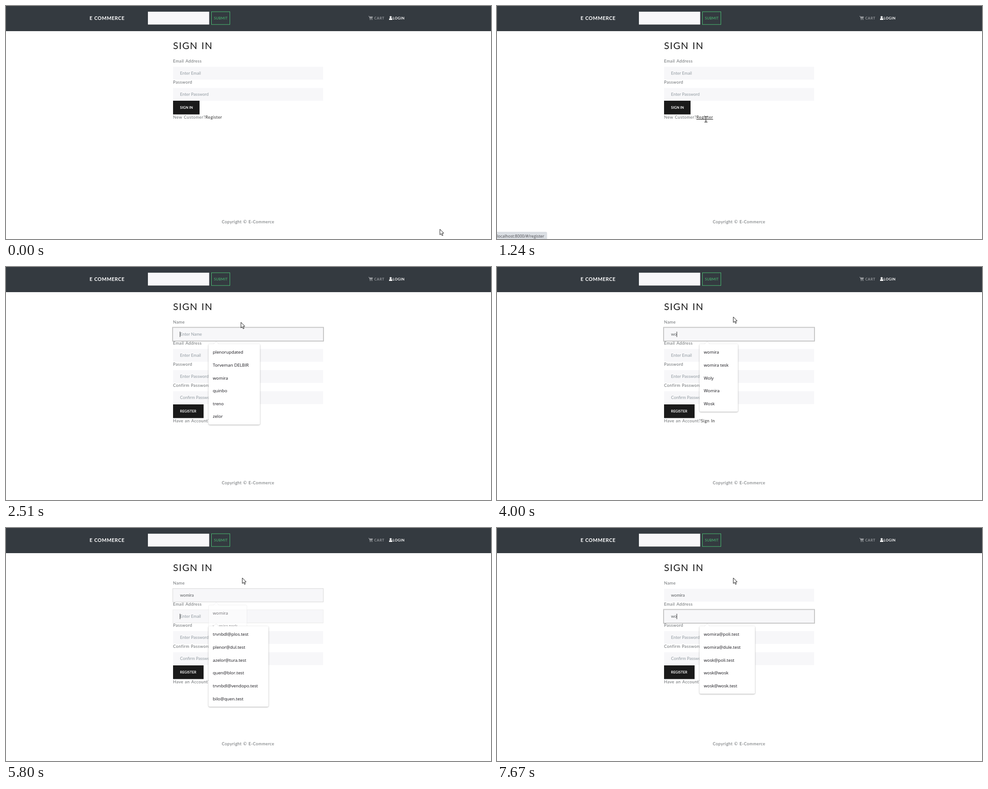
Recreate the animation shown at these times as an HTML page with a canvas. Size 1080x519 px, loop 8 s.

```html
<!DOCTYPE html>
<html lang="en">
<head>
<meta charset="utf-8">
<title>Sign in and register</title>
<style>
  html, body { margin: 0; width: 100%; height: 100%; overflow: hidden; background: #fff; }
  canvas { display: block; width: 100%; height: 100%; }
</style>
</head>
<body>
<canvas id="stage" width="1080" height="519"></canvas>
<script>
const ctx = document.getElementById('stage').getContext('2d');
const LOOP = 8000, BLINK = 530;
const INK = '#1a1a1a', BODY = '#55595c', HINT = '#919aa1', FIELD = '#f7f7f9';
const LEFT = 372, FIELD_W = 334, FIELD_H = 28.5, ROW = 47.1;
const SANS = 'Lato, sans-serif', UI = '"Open Sans", sans-serif';

const STYLES = {
  title:  { font: `21.3px ${SANS}`, color: INK, gap: 1.5, word: 1 },
  brand:  { font: `bold 11px ${SANS}`, color: '#fff', gap: 0.5, word: 0.5 },
  submit: { font: `7.7px ${SANS}`, color: '#4bbf73', gap: 0.35 },
  cart:   { font: `bold 7.8px ${SANS}`, color: '#999ca0', gap: 0.7 },
  login:  { font: `bold 7.8px ${SANS}`, color: '#fff', gap: 0.55 },
  label:  { font: `9.33px ${SANS}`, color: '#686c6f', gap: 0.45, word: 0.6 },
  link:   { font: `9.33px ${SANS}`, color: '#2c2c2c', gap: 0.5, word: 0.6 },
  button: { font: `bold 7.7px ${SANS}`, color: '#fff', gap: 0.1 },
  value:  { font: `9.33px ${SANS}`, color: BODY },
  hint:   { font: `9.33px ${SANS}`, color: HINT },
  option: { font: `9.7px ${UI}`, color: '#15141a' },
  status: { font: `9px ${UI}`, color: '#4a4a4f' }
};

const LOGIN_PAGE = {
  rows: [['Email Address', 'Enter Email'], ['Password', 'Enter Password']],
  button: 'SIGN IN', buttonW: 59, ask: 'New Customer?', link: 'Register', linkX: 444
};
const JOIN_PAGE = {
  rows: [['Name', 'Enter Name'], ['Email Address', 'Enter Email'],
         ['Password', 'Enter Password'], ['Confirm Password', 'Confirm Password']],
  button: 'REGISTER', buttonW: 68, ask: 'Have an Account?', link: 'Sign In', linkX: 454
};

// Times at which the pointer clicks or a state changes
const HOVER = 740, JOIN = 1310, FOCUS_NAME = 2270, FOCUS_MAIL = 5800;

const NAME_KEYS = [[3930, 'w'], [4000, 'wo'], [4730, 'wom'], [4800, 'womi'], [4870, 'womir'], [5070, 'womira']];
const MAIL_KEYS = [[6540, 'w'], [6610, 'wo']];

const MENUS = [
  { at: FOCUS_NAME, row: 0, w: 115, items: ['plenorupdated', 'Torveman DELBIR', 'womira', 'quinbo', 'treno', 'zelor'] },
  { at: 4000, row: 0, w: 86, items: ['womira', 'womira tesk', 'Woly', 'Womira', 'Wosk'] },
  { at: 4870, row: 0, w: 86, items: ['womira', 'womira tesk', 'Womira'] },
  { at: FOCUS_MAIL, row: 1, w: 134, items: ['trvnbdl@plos.test', 'plenor@dul.test', 'azelor@tura.test',
    'quen@blor.test', 'trvnbdl@vendopo.test', 'bilo@quen.test'] },
  { at: 6610, row: 1, w: 163, items: ['womira@poli.test', 'womira@dule.test', 'wosk@poli.test',
    'wosk@wosk', 'wosk@wosk.test', 'plenorwosk.tolbe@dulen.test'] },
  { at: 6680, row: 1, w: 124, items: ['womira@poli.test', 'womira@dule.test', 'wosk@poli.test', 'wosk@wosk', 'wosk@wosk.test'] }
];

// Pointer moves: start, end, number of steps, target x and y
const MOVES = [
  [70, 810, 11, 465, 252],
  [1560, 1760, 4, 421, 143],
  [2030, 2240, 4, 432, 146],
  [2310, 2510, 4, 523, 123],
  [2580, 2720, 3, 526, 111]
];

const clamp = v => Math.max(0, Math.min(1, v));
const smooth = v => v * v * (3 - 2 * v);
const latest = (list, time, t) => list.filter(e => time(e) <= t).pop();
const fieldY = row => 135.5 + row * ROW;

// Progress of a short transition, held between ticks of the screen
function transition(t, at) {
  if (t < at) return 0;
  const held = Math.floor((t - at) / 70) * 70;
  return clamp((held + 60) / 150);
}

function stepped(t, from, to, count) {
  if (t < from) return 0;
  const tick = (to - from) / (count - 1);
  return clamp((Math.floor((t - from) / tick + 1e-6) + 1) / count);
}

function text(str, x, y, style, align = 'left') {
  const s = STYLES[style];
  ctx.font = s.font;
  ctx.fillStyle = s.color;
  ctx.letterSpacing = (s.gap || 0) + 'px';
  ctx.wordSpacing = (s.word || 0) + 'px';
  ctx.textAlign = align;
  ctx.fillText(str, x, y);
  return ctx.measureText(str).width;
}

function rect(x, y, w, h, color) {
  ctx.fillStyle = color;
  ctx.fillRect(x, y, w, h);
}

function disc(x, y, r) {
  ctx.beginPath();
  ctx.arc(x, y, r, 0, 7);
  ctx.fill();
}

function poly(points, close = true) {
  ctx.beginPath();
  points.forEach(([x, y]) => ctx.lineTo(x, y));
  if (close) ctx.closePath();
}

function drawHeader() {
  rect(0, 0, 1080, 56, '#343a40');
  text('E COMMERCE', 186, 31, 'brand');
  rect(316, 12.7, 136.5, 28.6, FIELD);
  ctx.strokeStyle = '#4bbf73';
  ctx.lineWidth = 1;
  ctx.strokeRect(457.5, 12.8, 41, 28.4);
  text('SUBMIT', 463, 30.3, 'submit');

  ctx.fillStyle = ctx.strokeStyle = '#999ca0';
  poly([[807, 22.8], [808.8, 22.8], [810.3, 28.4], [816, 28.4]], false);
  ctx.stroke();
  poly([[809, 23.4], [817, 23.4], [815.8, 27.3], [810, 27.3]]);
  ctx.fill();
  disc(811, 30.2, 1);
  disc(815, 30.2, 1);
  text('CART', 820, 29.7, 'cart');

  ctx.fillStyle = '#fff';
  disc(856.5, 24.7, 2.3);
  ctx.beginPath();
  ctx.roundRect(853, 27.2, 7.2, 3.8, [2.2, 2.2, 0.6, 0.6]);
  ctx.fill();
  text('LOGIN', 861, 29.7, 'login');
}

function drawRing(row, p) {
  if (p <= 0) return;
  const d = 2 * p, y = fieldY(row);
  ctx.fillStyle = `rgba(26,26,26,${0.25 * p})`;
  ctx.beginPath();
  ctx.rect(LEFT - d, y - d, FIELD_W + 2 * d, FIELD_H + 2 * d);
  ctx.rect(LEFT, y, FIELD_W, FIELD_H);
  ctx.fill('evenodd');
}

function drawForm(page, values, hovered) {
  text('SIGN IN', LEFT, 96, 'title');
  page.rows.forEach(([label, hint], i) => {
    const y = fieldY(i);
    text(label, LEFT, y - 9.8, 'label');
    rect(LEFT, y, FIELD_W, FIELD_H, FIELD);
    text(values[i] || hint, 387.6, y + 17.6, values[i] ? 'value' : 'hint');
  });
  const y = Math.round(117.2 + page.rows.length * ROW);
  rect(LEFT, y, page.buttonW, 30.5, INK);
  text(page.button, 387.6, y + 18, 'button');
  text(page.ask, LEFT, y + 39.6, 'label');
  const w = text(page.link, page.linkX, y + 39.6, 'link');
  if (hovered) rect(page.linkX, y + 41, w, 1, INK);
}

function drawCaret(t, row, str, since) {
  if (Math.floor((t - since) / BLINK) % 2) return;
  ctx.font = STYLES.value.font;
  ctx.letterSpacing = ctx.wordSpacing = '0px';
  const x = str ? 387 + ctx.measureText(str).width : 387;
  rect(Math.round(x), Math.round(144 + row * ROW), 1, 12, '#333');
}

function drawMenu({ row, w, items }, alpha) {
  const x = 451, y = 171.5 + row * ROW;
  ctx.save();
  ctx.globalAlpha = alpha;
  // A shadow would show through a panel that is fading out
  if (alpha === 1) {
    ctx.shadowColor = 'rgba(0,0,0,.32)';
    ctx.shadowBlur = 3;
    ctx.shadowOffsetY = 1;
  }
  ctx.fillStyle = '#fff';
  ctx.beginPath();
  ctx.roundRect(x, y, w - 0.5, items.length * 28.65 + 7.5, 3);
  ctx.fill();
  ctx.shadowColor = 'transparent';
  ctx.strokeStyle = '#dedee0';
  ctx.lineWidth = 0.7;
  if (alpha < 1) ctx.stroke();
  poly([[x + 11, y + 0.5], [x + 17, y - 5.5], [x + 23, y + 0.5]]);
  ctx.fill();
  poly([[x + 11, y], [x + 17, y - 5.5], [x + 23, y]], false);
  ctx.stroke();
  items.forEach((item, i) => text(item, 460.5, y + 21.7 + i * 28.65, 'option'));
  ctx.restore();
}

function drawStatus(alpha) {
  if (alpha <= 0) return;
  ctx.save();
  ctx.globalAlpha = alpha;
  ctx.fillStyle = '#dadee3';
  ctx.beginPath();
  ctx.roundRect(-4, 503, 115.5, 20, 3);
  ctx.fill();
  text('localhost:8000/#/register', 0, 516, 'status');
  ctx.restore();
}

function pointerAt(t) {
  let x = 966, y = 497;
  for (const [from, to, count, tx, ty] of MOVES) {
    const p = smooth(stepped(t, from, to, count));
    x += (tx - x) * p;
    y += (ty - y) * p;
  }
  return [Math.round(x), Math.round(y)];
}

function drawPointer(t) {
  const beam = t >= HOVER && t < 2440;
  ctx.save();
  ctx.translate(...pointerAt(t));
  if (beam) {
    rect(-1, -6, 3, 13, 'rgba(255,255,255,.6)');
    rect(-0.4, -6, 1.4, 13, '#222');
    for (const y of [-6.5, 6]) {
      rect(-3, y, 2.8, 1.2, '#222');
      rect(0.8, y, 2.8, 1.2, '#222');
    }
  } else {
    poly([[0.2, 0.2], [0.2, 12.6], [3, 10.1], [5.1, 14.6], [7.1, 13.7], [5.1, 9.4], [8.8, 9]]);
    ctx.fillStyle = '#fff';
    ctx.fill();
    ctx.strokeStyle = '#111';
    ctx.lineWidth = 1;
    ctx.stroke();
  }
  ctx.restore();
}

function draw(t) {
  rect(0, 0, 1080, 519, '#fff');
  drawHeader();

  const nameKey = latest(NAME_KEYS, k => k[0], t) || [FOCUS_NAME, ''];
  const mailKey = latest(MAIL_KEYS, k => k[0], t) || [FOCUS_MAIL, ''];
  const page = t < JOIN ? LOGIN_PAGE : JOIN_PAGE;
  drawForm(page, [nameKey[1], mailKey[1]], t >= HOVER && t < JOIN);
  text('Copyright © E-Commerce', 539, 484, 'label', 'center');

  const leaving = transition(t, FOCUS_MAIL);
  drawRing(0, transition(t, FOCUS_NAME) - leaving);
  drawRing(1, leaving);
  if (t >= FOCUS_MAIL) drawCaret(t, 1, mailKey[1], mailKey[0]);
  else if (t >= FOCUS_NAME) drawCaret(t, 0, nameKey[1], nameKey[0]);

  if (leaving > 0 && leaving < 1) drawMenu(MENUS[2], 1 - leaving);
  const menu = latest(MENUS, m => m.at, t);
  if (menu) drawMenu(menu, 1);

  drawStatus(transition(t, 1010) - transition(t, 1560));
  drawPointer(t);
}

const start = performance.now();
function tick() {
  draw((performance.now() - start) % LOOP);
  requestAnimationFrame(tick);
}
tick();
</script>
</body>
</html>
```
